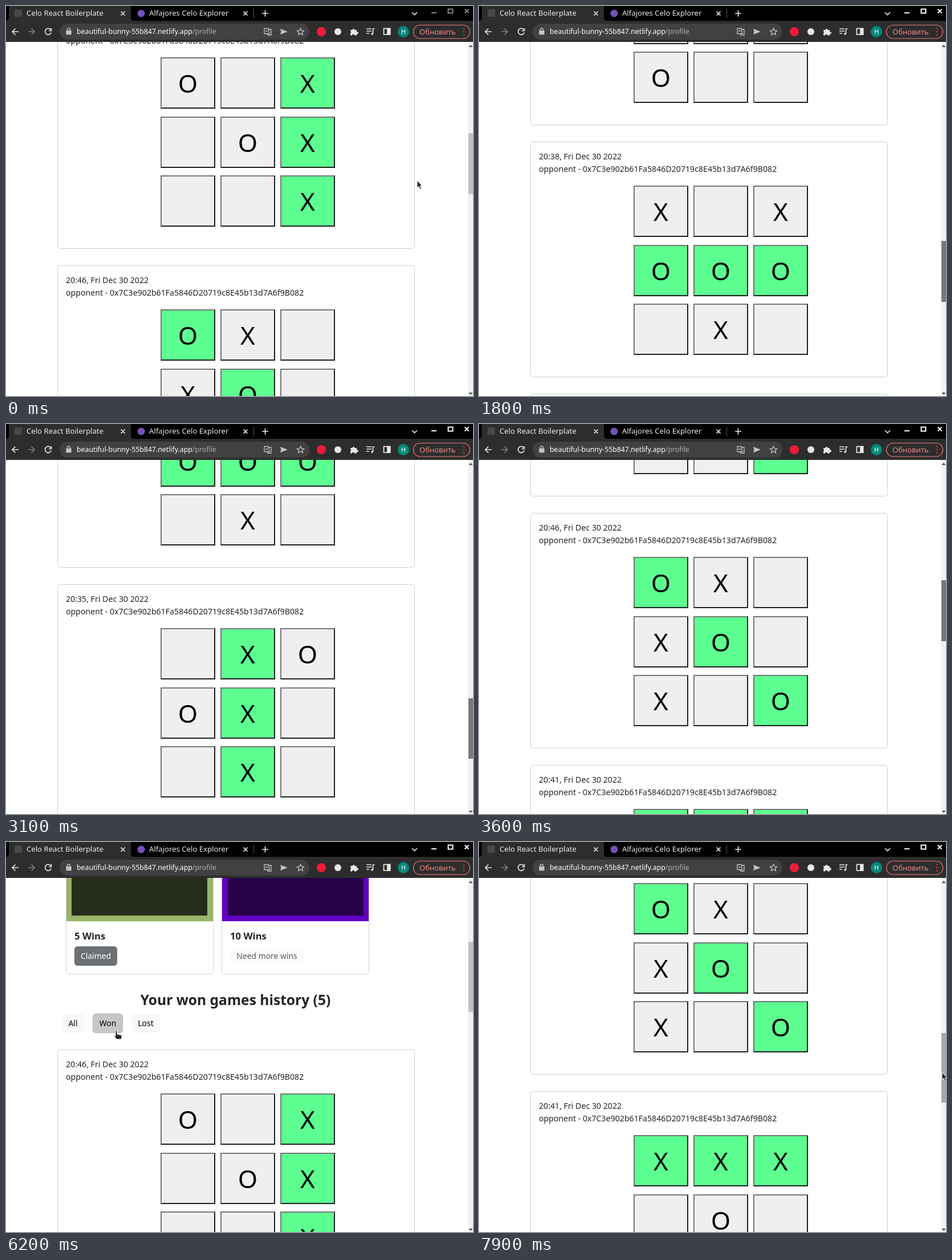
Recreate the animation shown at these times as an HTML page. Size 819 by 684 pixels, loop 8000 ms.

```html
<!DOCTYPE html>
<html lang="en">
<head>
<meta charset="utf-8">
<title>Game history</title>
<style>
* { box-sizing: border-box; }
html, body { margin: 0; width: 100%; height: 100%; overflow: hidden; }
#stage { position: relative; width: 819px; height: 684px; overflow: hidden; background: #fff;
  font: 14.15px/21.6px "Noto Sans", "Open Sans", sans-serif; color: #212529; }
#stage > *, #page > *, .card > *, .prize > * { position: absolute; }
#view { left: 0; top: 63px; width: 810px; height: 621px; overflow: hidden; }
#page { position: absolute; left: 0; top: 0; width: 810px; }
.prize { top: 316px; width: 259px; height: 351px; border: 1px solid #d3d4d5; border-radius: 5px; overflow: hidden; }
.art { top: -1px; width: 258px; height: 258px; border: 10px solid; }
.prize b { left: 14px; top: 272px; font-size: 16.7px; font-weight: 600; }
.btn { height: 34px; border: 1px solid #f8f9fa; border-radius: 5px; background: #f8f9fa;
  color: #000; font-size: 13.9px; line-height: 32px; text-align: center; }
.prize .btn { left: 14px; top: 301px; }
.btn.hover { background: #d3d4d5; border-color: #c6c7c8; }
.btn.on { background: #c6c7c8; border-color: #b5b6b7; }
#filters .btn { position: absolute; top: 0; }
#heading { left: 90px; width: 625px; top: 694px; line-height: 36px; font-size: 24.6px; font-weight: 600; text-align: center; }
#filters { left: 0; top: 736px; }
#games { left: 90px; top: 799px; }
.card { position: relative; width: 627px; height: 413px; margin-bottom: 29px; border: 1px solid #ced0d2; border-radius: 5px; }
.card p { margin: 0; left: 14px; top: 14px; white-space: pre; }
.cell { width: 96px; height: 90px; background: #efefef; border: 2px solid; border-color: #767676 #1e1e1e #1e1e1e #767676;
  font-size: 44px; line-height: 86px; color: #000; text-align: center; }
.cell.win { background: #5cff90; }
#bar { left: 810px; top: 63px; width: 9px; height: 621px; background: #f1f1f1; }
#thumb { left: 811px; width: 8px; }
#chrome, #arrows, #pointer { left: 0; top: 0; }
#pointer { overflow: visible; }
</style>
</head>
<body>
<div id="stage">
  <div id="view"><div id="page">
    <div class="prize" style="left:105px">
      <div class="art" style="left:-1px;background:#262d1b;border-color:#98b668"></div>
      <b>5 Wins</b><div class="btn" style="width:75px;background:#6d7174;border-color:#6d7174;color:#fff">Claimed</div>
    </div>
    <div class="prize" style="left:378px">
      <div class="art" style="left:0;background:#28014b;border-color:#6200c4"></div>
      <b>10 Wins</b><div class="btn" style="width:129px;background:#fafbfb;border-color:#fafbfb;color:#575757">Need more wins</div>
    </div>
    <div id="heading"></div>
    <div id="filters">
      <div class="btn" style="left:97px;width:41px">All</div>
      <div class="btn" style="left:152px;width:53px">Won</div>
      <div class="btn" style="left:220px;width:50px">Lost</div>
    </div>
    <div id="games"></div>
  </div></div>
  <div id="bar"></div>
  <div id="thumb"></div>
  <svg id="arrows" width="819" height="684" fill="#505050"><path d="M811.500 72l3.500-4 3.500 4zM811.500 678l3.500 4 3.500-4z"/></svg>

  <svg id="chrome" width="819" height="63" fill="none" stroke="#e8e8e8" stroke-width="1.700" font-family="Noto Sans, Open Sans, sans-serif">
    <g stroke="none">
      <path fill="#000" d="M0 0h819v27H0z"/>
      <path fill="#2d2d2d" d="M0 26Q5 26 5 20V0H219V20Q219 26 225 26H819V63H0z"/>
      <rect x="94" y="31" width="438" height="28" rx="14" fill="#414141"/>
      <rect x="15" y="6" width="13" height="13" fill="#484848"/>
      <circle cx="237" cy="13" r="6.500" fill="#7652b8"/>
      <g fill="#ececec" font-size="13.150">
        <text x="36" y="17">Celo React Boilerplate</text>
        <text x="251" y="17">Alfajores Celo Explorer</text>
      </g>
      <text x="124" y="49" font-size="12.300" fill="#fff">beautiful-bunny-55b847.netlify.app<tspan fill="#b0b0b0">/profile</tspan></text>
      <circle cx="553" cy="45" r="8" fill="#ed1c3a"/>
      <circle cx="582" cy="45" r="6" fill="#e8e8e8"/>
      <circle cx="697" cy="45" r="10" fill="#00897b"/>
      <text x="697" y="49" font-size="11" fill="#fff" text-anchor="middle">H</text>
    </g>
    <path d="M201.500 9.500l7 7m0-7l-7 7M416.500 9.500l7 7m0-7l-7 7M449 13h11M454.500 7.500v11M712 11l4.500 4.500L721 11"/>
    <path d="M434.500 5v16" stroke="#555" stroke-width="1"/>
    <g id="controls" stroke-width="2"><path d="M746 12h9M804.500 5.500l7 7m0-7l-7 7"/><rect x="775.500" y="5.500" width="8" height="7"/></g>
    <path d="M22 45H11m5.500-5.500L11 45l5.500 5.500M78.500 41.500A5.500 5.500 0 1 0 79.300 46.500M79.500 39v4.500H75"/>
    <path d="M39 45h11m-5.500-5.500L50 45l-5.500 5.500" stroke="#808080"/>
    <g stroke="#c4c4c4" stroke-width="1.300">
      <path d="M106 43.500h8v6h-8z" fill="#c4c4c4"/><path d="M107.500 43v-1.500a2.500 2.500 0 0 1 5 0V43"/>
      <path d="M453 39.500h7l2 9h-9zM460.500 41h4.500v10h-6l-1-2.500M455 44h4"/>
      <path d="M481 40l13 5-13 5 1.500-5z" fill="#c4c4c4" stroke="none"/>
      <path d="M516.500 39l1.800 4 4.200.400-3.200 2.800 1 4.300-3.800-2.300-3.800 2.300 1-4.300-3.200-2.800 4.200-.400z"/>
    </g>
    <path d="M604 42h3.500a2 2 0 1 1 4 0h3.500v3.500a2 2 0 1 1 0 3.500v2.500h-4a2 2 0 0 0-4 0h-3v-4a2 2 0 0 0 0-3.500z" fill="#e8e8e8" stroke="none"/>
    <path d="M632 40h9M632 44h9M632 48h5M643.500 49v-9h3"/><circle cx="642" cy="49" r="1.800" fill="#e8e8e8" stroke="none"/>
    <rect x="662.500" y="39.500" width="11" height="10.500"/><path d="M669 39.500h4.500V50H669z" fill="#e8e8e8"/>
    <rect x="714.500" y="33.500" width="99" height="23.500" rx="11.700" stroke="#ec7b78" stroke-width="1.200"/>
    <text x="725" y="49.500" font-size="13" fill="#f08a85" stroke="none">Обновить</text>
    <path d="M803 39.500v.010M803 45v.010M803 50.500v.010" stroke="#e5342e" stroke-width="2.600" stroke-linecap="round"/>
  </svg>

  <svg id="pointer" width="1" height="1" fill="#262626" stroke="#fff" stroke-linejoin="round">
    <path id="arrow" d="M0 0V13l3-2.600 2.200 5 2.300-1-2.200-4.800H9z"/>
    <path id="hand" d="M-2 0Q0-2 1 1V6L8 7.500Q9.500 8 9 11L8 15H0L-4 10Q-4 8-2 9z"/>
  </svg>
</div>

<script>
const $ = id => document.getElementById(id);
const LOOP = 8000, STEP = 100, TRACK_TOP = 77, TRACK = 593, VIEW = 621;
const opponent = "0x7C3e902b61Fa5846D20719c8E45b13d7A6f9B082";

// Uppercase marks form the winning line.
const games = [
  ["20:46", "o.X.oX..X"], ["20:46", "Ox.xO.x.O"], ["20:41", "XXX.o.o.."],
  ["20:38", "x.xOOO.x."], ["20:35", ".XooX..X."], ["20:33", "Xoo.X...X"]
];
const LOST = 3;

$("games").innerHTML = games.map(([time, marks]) => {
  const cells = [...marks].map((m, i) => {
    const left = 180 + i % 3 * 105, top = 76 + Math.floor(i / 3) * 103.5;
    return `<div class="cell ${/[XO]/.test(m) ? "win" : ""}" style="left:${left}px;top:${top}px">${m.replace(".", "").toUpperCase()}</div>`;
  }).join("");
  return `<div class="card"><p>${time}, Fri Dec 30 2022\nopponent - ${opponent}</p>${cells}</div>`;
}).join("");

const scrollKeys = [[800, 849], [1200, 1321], [2500, 2684], [2700, 2829], [2900, 2829], [3600, 1148],
  [3900, 790], [4200, 524], [4700, 498], [6700, 498], [7800, 1309]];
const pointerKeys = [[0, 721, 306], [100, 721, 306], [200, 763, 294], [400, 763, 294], [500, 814, 268],
  [800, 814, 268], [900, 830, 268], [4100, 830, 215], [4200, 815, 212], [4700, 815, 208],
  [5300, 195, 312], [5500, 169, 316], [5700, 169, 316], [5800, 175, 317], [5900, 183, 319],
  [6100, 183, 319], [6200, 194, 331], [6600, 812, 244], [6700, 812, 244], [7800, 812, 404]];

function sample(keys, t) {
  const next = keys.findIndex(k => k[0] > t);
  if (next < 0) return keys[keys.length - 1].slice(1);
  if (next === 0) return keys[0].slice(1);
  const a = keys[next - 1], b = keys[next], f = (t - a[0]) / (b[0] - a[0]);
  return a.slice(1).map((v, i) => v + (b[i + 1] - v) * f);
}

const within = (t, from, to) => t >= from && t < to;

function draw(now) {
  const t = Math.floor(now % LOOP / STEP) * STEP;
  const scroll = Math.round(sample(scrollKeys, t)[0]);
  const [x, y] = sample(pointerKeys, t);
  const won = t >= 5400, count = won ? 5 : 6, height = 799 + 442 * count;

  $("page").style.top = -scroll + "px";
  $("heading").textContent = `Your ${won ? "won " : ""}games history (${count})`;
  $("games").children[LOST].style.display = won ? "none" : "";

  const overWon = within(t, 5300, 6300);
  [...$("filters").children].forEach((button, i) => {
    button.classList.toggle("on", i === (won ? 1 : 0));
    button.classList.toggle("hover", i === 1 && overWon && !won);
  });

  const dragging = within(t, 900, 4800) || within(t, 6700, 7900);
  const thumb = $("thumb").style;
  thumb.top = TRACK_TOP + scroll * TRACK / height + "px";
  thumb.height = TRACK * VIEW / height + "px";
  thumb.background = dragging ? "#787878" : x > 810 ? "#a8a8a8" : "#c1c1c1";

  $("controls").setAttribute("stroke", t < 900 ? "#858585" : "#fff");
  $("pointer").style.transform = `translate(${x}px, ${y}px)`;
  $("arrow").style.display = overWon ? "none" : "";
  $("hand").style.display = overWon ? "" : "none";
}

const start = performance.now();
function tick() {
  draw(performance.now() - start);
  requestAnimationFrame(tick);
}
tick();
</script>
</body>
</html>
```
